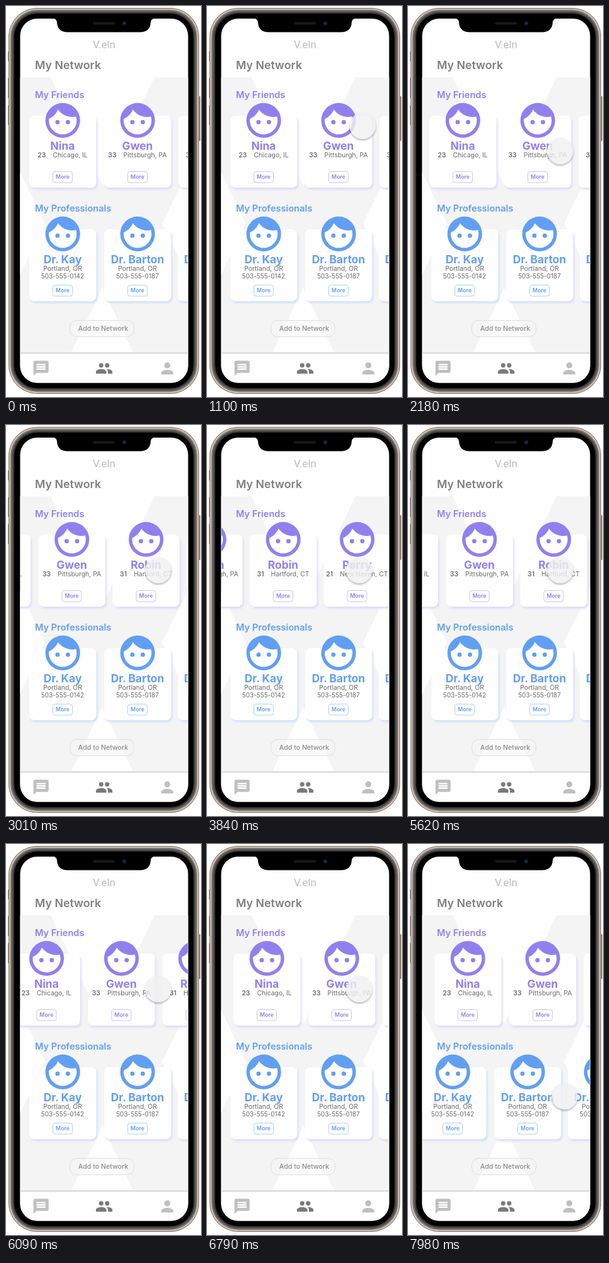
These frames come from a looping animation (310x620 px, 8 s). An HTML page:

```html
<!DOCTYPE html>
<html lang="en">
<head>
<meta charset="utf-8">
<title>My Network</title>
<style>
  html, body { margin: 0; width: 100%; height: 100%; overflow: hidden; background: #fff; }
  svg { display: block; width: 310px; height: 620px; font-family: Inter, "Open Sans", sans-serif; }
  .friends { --tint: #9080ef; --edge: #c9c2f8; --shade: #dfdbfb; }
  .pros { --tint: #619ff2; --edge: #acd0fa; --shade: #d5dffa; }
  .tint { fill: var(--tint); }
  .mid { text-anchor: middle; }
  .title { font-size: 17.8px; font-weight: 600; fill: #7f7f7f; }
  .head { font-size: 14.6px; font-weight: 600; }
  .name { font-size: 17.4px; font-weight: 700; }
  .info { font-size: 10.4px; font-weight: 400; fill: #6c6c6c; }
  .phone { font-size: 10px; }
  .age { font-weight: 600; }
  .more { font-size: 8.8px; font-weight: 600; }
  .add { font-size: 10.6px; font-weight: 500; fill: #8a8a8a; }
  .card { fill: #fefefe; filter: drop-shadow(2.5px 3px 1.5px var(--shade)); }
  .btn { fill: #fff; stroke: var(--edge); }
  .dot { fill: #f1f1f1; opacity: .82; filter: drop-shadow(0 2px 1.5px rgba(0, 0, 0, .34)); }
</style>
</head>
<body>
<svg viewBox="0 0 310 620">
  <defs>
    <clipPath id="screen"><rect x="22.5" y="20" width="267" height="577.5" rx="27"/></clipPath>
    <clipPath id="content"><rect x="23" y="113" width="266" height="437"/></clipPath>
    <g id="face">
      <circle r="9" fill="#fff"/>
      <path class="tint" transform="translate(-12 -12)" fill-rule="evenodd" d="M12 2a10 10 0 1 0 0 20 10 10 0 0 0 0-20zm0 18c-4.41 0-8-3.59-8-8 0-.29.02-.58.05-.86 2.36-1.05 4.23-2.98 5.21-5.37C11.07 8.33 14.05 10 17.42 10c.78 0 1.53-.09 2.25-.26.21.71.33 1.47.33 2.26 0 4.41-3.59 8-8 8z"/>
      <circle class="tint" cx="-3" cy="1" r="1.25"/>
      <circle class="tint" cx="3" cy="1" r="1.25"/>
    </g>
  </defs>

  <!-- phone body -->
  <g fill="#9a8674">
    <rect x="3" y="72" width="2" height="16" rx="1"/>
    <rect x="3" y="114" width="2" height="32" rx="1"/>
    <rect x="3" y="157" width="2" height="32" rx="1"/>
    <rect x="306" y="143" width="3" height="71" rx="1"/>
  </g>
  <g id="rim"></g>

  <g clip-path="url(#screen)">
    <rect x="22" y="20" width="268" height="578" fill="#fefefe"/>
    <rect x="22" y="113" width="268" height="438" fill="#f4f4f4"/>
    <path fill="#fefefe" d="M71 113H236L153.500 285zM22 263L62 345 22 427zM290 260L248 345 290 430zM103 551H203L153 447z"/>
    <text class="mid" x="156" y="66.5" font-family="Roboto, sans-serif" font-size="17" fill="#bdbdbd">V.eln</text>
    <text class="title" x="46" y="99.5">My Network</text>

    <g clip-path="url(#content)">
      <g class="friends">
        <text class="head tint" x="46" y="146">My Friends</text>
        <g id="friends"></g>
      </g>
      <g class="pros">
        <text class="head tint" x="46" y="326">My Professionals</text>
        <g id="pros"></g>
      </g>
    </g>

    <rect x="101.5" y="498.5" width="102" height="26" rx="11" fill="#f8f8f8" fill-opacity=".5" stroke="#dedede"/>
    <text class="add mid" x="154.5" y="515">Add to Network</text>

    <rect x="22" y="549" width="268" height="3" fill="#dcdcdc"/>
    <rect x="22" y="551.5" width="268" height="47" fill="#fefefe"/>
    <g fill="#bfbfbf">
      <path transform="translate(41.3 560.2) scale(1.2)" fill-rule="evenodd" d="M20 2H4a2 2 0 0 0-2 2V22l4-4h14a2 2 0 0 0 2-2V4a2 2 0 0 0-2-2zM18 14H6v-2h12zm0-3H6V9h12zm0-3H6V6h12z"/>
      <path transform="translate(242 560.2) scale(1.2)" d="M12 12a4 4 0 1 0 0-8 4 4 0 0 0 0 8zm0 2c-2.67 0-8 1.34-8 4v2h16v-2c0-2.66-5.33-4-8-4z"/>
    </g>
    <path transform="translate(141.8 560.3) scale(1.19)" fill="#7a7a7a" d="M16 11a3 3 0 1 0 0-6 3 3 0 0 0 0 6zM8 11a3 3 0 1 0 0-6 3 3 0 0 0 0 6zm0 2c-2.33 0-7 1.17-7 3.5V19h14v-2.5c0-2.33-4.67-3.5-7-3.5zm8 0c-.29 0-.62.02-.97.05 1.16.84 1.97 1.97 1.97 3.45V19h6v-2.5c0-2.33-4.67-3.5-7-3.5z"/>
  </g>

  <!-- notch -->
  <path d="M74 19.5Q80.500 20 81 26Q82 41.500 98 41.500H213Q229 41.500 230 26Q230.500 20 237 19.500z"/>
  <rect x="138" y="25.500" width="35" height="4" rx="2" fill="#1a1a1c"/>
  <circle cx="188" cy="27.500" r="3.500" fill="#11152a"/>
  <circle cx="188" cy="27.500" r="1.500" fill="#27366e"/>

  <g id="touch"><circle class="dot" r="21"/></g>
</svg>
<script>
const $ = id => document.getElementById(id);
const LOOP = 8000;

// [inset, colour] from the metal edge to the black bezel
$('rim').innerHTML = [
  [0, '#8c7563'], [1.2, '#d6cbc1'], [2.8, '#8a8580'], [4.5, '#5a5856'], [7, '#383838'], [9, '#000']
].map(([d, fill]) => `<rect x="${4 + d}" y="${3 + d}" width="${303 - 2 * d}"
  height="${612 - 2 * d}" rx="${46 - d}" fill="${fill}"/>`).join('');

const card = (x, top, name, body) => `
  <g transform="translate(${x} ${top})">
    <rect class="card" x="-53.5" y="20" width="106.5" height="114" rx="8"/>
    <use href="#face" transform="translate(-.3 27.4) scale(2.76)"/>
    <text class="name tint mid" x="-.5" y="73.5">${name}</text>
    ${body}
    <rect class="btn" x="-16" y="108.5" width="31" height="17.5" rx="3.5"/>
    <text class="more tint mid" x="-.5" y="120.4">More</text>
  </g>`;

const friend = ([x, name, age, city]) => card(x, 154, name,
  `<text class="info mid" x="-.5" y="86"><tspan class="age">${age}</tspan><tspan dx="11">${city}</tspan></text>`);

const pro = ([x, name, phone]) => card(x, 334, name,
  `<text class="info mid" x="-.5" y="85.5">Portland, OR</text>
   <text class="info phone mid" x="-.5" y="97.5">${phone}</text>`);

$('friends').innerHTML = [
  [90.5, 'Nina', 23, 'Chicago, IL'],
  [209.5, 'Gwen', 33, 'Pittsburgh, PA'],
  [327.5, 'Robin', 31, 'Hartford, CT'],
  [445, 'Perry', 21, 'New Haven, CT']
].map(friend).join('');

$('pros').innerHTML = [
  [90.5, 'Dr. Kay', '503-555-0142'],
  [209.5, 'Dr. Barton', '503-555-0187'],
  [326.5, 'Dr. Sloane', '503-555-0163']
].map(pro).join('');

// [time, offset] pairs, linear in between
const friendSlide = [[2154, 0], [4069, -235], [4645, -235], [5606, -95.5], [6286, 5]];
const proSlide = [[7820, 0], [8000, -22.8]];

const clamp = v => Math.min(1, Math.max(0, v));
const part = (t, a, b) => clamp((t - a) / (b - a));

function slide(keys, t) {
  let x = keys[0][1];
  for (let i = 1; i < keys.length; i++)
    x += (keys[i][1] - keys[i - 1][1]) * part(t, keys[i - 1][0], keys[i][0]);
  return x;
}

// enters along a curve from the right, later swings down to the second row
function touchAt(t) {
  const a = part(t, 380, 1580), b = part(t, 6906, 7378), c = 1 - b;
  if (b === 0) return [242 + 85 * (1 - a) ** 3, 130 + 100 * a];
  return [242 * c * c + 608 * b * c + 249 * b * b, 230 + 170 * b];
}

// motion is held in short, even beats
const beat = (t, from, len) => from + Math.floor((t - from) / len) * len;
const snap = t => t < 500 ? 0 : t < 2178 ? beat(t, 500, 120) : beat(t, 2178, 118.2);

const move = (el, x, y) => el.setAttribute('transform', `translate(${x.toFixed(2)} ${y.toFixed(2)})`);

const start = performance.now();
function draw(now) {
  const t = snap(Math.max(0, now - start) % LOOP);
  move($('friends'), slide(friendSlide, t), 0);
  move($('pros'), slide(proSlide, t), 0);
  move($('touch'), ...touchAt(t));
  $('touch').style.display = t < 500 ? 'none' : '';
  requestAnimationFrame(draw);
}
draw(start);
</script>
</body>
</html>
```
